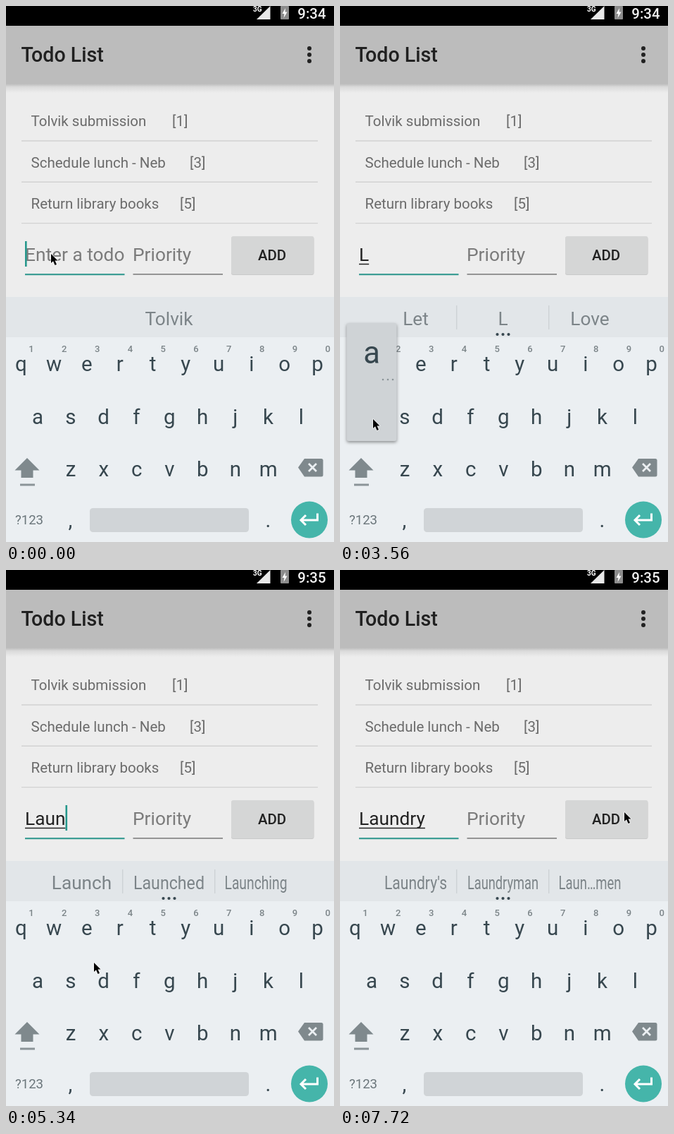
Write an HTML page with a canvas that moves like this. It is 466x759 px and loops after 8 s.

```html
<!DOCTYPE html>
<html lang="en">
<head>
<meta charset="utf-8">
<title>Todo List</title>
<style>
html, body { margin: 0; width: 100%; height: 100%; overflow: hidden; background: #ededed; }
canvas { display: block; }
</style>
</head>
<body>
<canvas id="stage" width="466" height="759"></canvas>
<script>
const ctx = document.getElementById('stage').getContext('2d');
const LOOP = 8000, STEP = 148.4;
const INK = '#37474f', TEAL = '#45b5aa', ICON = '#7f898d', BOARD = '#ebeff2', ACCENT = '#26988c';

const ROWS = [
  { keys: 'qwertyuiop', x: 21.3, y: 506 },
  { keys: 'asdfghjkl', x: 45, y: 581 },
  { keys: 'zxcvbnm', x: 92, y: 655 }
];
const PITCH = 46.8;

// [step, typed text, suggestions, autocorrecting]
const TYPING = [
  [-1.08, '', ['', 'Tolvik', ''], false],
  [20, 'L', ['Let', 'L', 'Love'], false],
  [25, 'La', ['Last', 'LA', 'Late'], true],
  [31, 'Lau', ['Laugh', 'Lay', 'Late'], true],
  [34, 'Laun', ['Launch', 'Launched', 'Launching'], false],
  [40, 'Laund', ['Laundry', 'Land', 'Laundering'], true],
  [44, 'Laundr', ['Laundr', 'Laundry', 'Laundering'], true],
  [48, 'Laundry', ["Laundry's", 'Laundryman', 'Laun…men'], false]
];

// [first step, last step, key]
const PRESSES = [
  [18, 19, 'l'], [23, 24, 'a'], [30, 30, 'u'], [33, 33, 'n'],
  [38, 39, 'd'], [43, 43, 'r'], [47, 47, 'y']
];

// [step, x, y] of the pointer tip
const POINTER = [
  [0, 64, 351], [5, 64, 351], [7, 58, 540], [9, 42, 710], [10, 36, 671], [11, 36, 671],
  [12, 62, 640], [15, 240, 605], [18, 415, 584], [19, 415, 584], [20, 365, 585],
  [23, 47, 585], [25, 47, 585], [29, 311, 505], [31, 309, 505], [33, 326, 650],
  [34, 322, 648], [36, 125, 556], [38, 139, 578], [40, 140, 575], [43, 161, 506],
  [44, 163, 506], [47, 256, 506], [48, 258, 504], [52, 404, 343]
];

function text(str, x, y, size, color, align = 'left', weight = 400) {
  ctx.font = `${weight} ${size}px Roboto, sans-serif`;
  ctx.textAlign = align;
  ctx.fillStyle = color;
  ctx.fillText(str, x, y);
}

function rect(x, y, w, h, color, r = 0) {
  ctx.fillStyle = color;
  ctx.beginPath();
  ctx.roundRect(x, y, w, h, r);
  ctx.fill();
}

function dot(x, y, r, color) {
  ctx.fillStyle = color;
  ctx.beginPath();
  ctx.arc(x, y, r, 0, 7);
  ctx.fill();
}

function shape(path, color, line) {
  const p = new Path2D(path);
  if (line) {
    ctx.strokeStyle = color;
    ctx.lineWidth = line;
    ctx.stroke(p);
  } else {
    ctx.fillStyle = color;
    ctx.fill(p);
  }
}

function pointerAt(n) {
  const i = POINTER.findIndex(p => p[0] > n);
  if (i < 0) return POINTER[POINTER.length - 1].slice(1);
  const [n0, x0, y0] = POINTER[i - 1], [n1, x1, y1] = POINTER[i];
  const k = (n - n0) / (n1 - n0);
  return [x0 + (x1 - x0) * k, y0 + (y1 - y0) * k];
}

function statusBar(clock) {
  rect(0, 0, 466, 28, '#000');
  text('3G', 351, 8, 10, '#fff', 'left', 700);
  shape('M356 19H375.500V0Z', '#e8e8e8');
  rect(390, 0, 12, 19, '#8c8c8c', 1);
  shape('M397 3L392.500 11H395.500L394.500 17L399.500 8.500H396.500Z', '#fff');
  text(clock, 454.500, 18, 20.4, '#f2f2f2', 'right', 500);
}

function toolbar() {
  const shade = ctx.createLinearGradient(0, 109, 0, 123);
  shade.addColorStop(0, '#b4b4b4');
  shade.addColorStop(0.4, '#dadada');
  shade.addColorStop(1, '#ededed');
  rect(0, 109, 466, 14, shade);
  rect(0, 28, 466, 82, '#bcbcbc');
  text('Todo List', 21.5, 79, 28.600, '#202020', 'left', 500);
  for (const y of [60, 69, 78]) dot(431, y, 3, '#222');
}

function list() {
  const items = [['Tolvik submission', 1, 236], ['Schedule lunch - Neb', 3, 261], ['Return library books', 5, 247]];
  items.forEach(([name, rank, x], i) => {
    const y = 170.3 + i * 58.3;
    text(name, 35.5, y, 20.5, '#6b6b6b');
    text(`[${rank}]`, x, y, 20.5, '#6b6b6b');
    rect(22, y + 20, 421, 1.4, '#d2d2d2');
  });
}

function form(n, since, typed, fixing) {
  text(typed || 'Enter a todo', 27, 361, 26.3, typed ? '#222' : '#7b7b7b');
  const width = typed ? ctx.measureText(typed).width : 0;
  if (typed) rect(27, fixing ? 363.5 : 364.8, width, fixing ? 3 : 1.5, fixing ? '#33b5e5' : '#222');
  rect(27, 379, 141.500, 2.3, '#3e9e95');
  text('Priority', 180, 361, 26.3, '#7b7b7b');
  rect(180.5, 379, 127.5, 1.7, '#888');
  // the caret restarts its half-second blink at each letter
  if (Math.floor((n - since) * STEP / 500) % 2 === 0) rect(27 + width, 333, 2.6, 36, ACCENT);
  rect(320, 327, 117.500, 54, '#c9c9c9', 3);
  rect(320, 326, 117.500, 54, '#d5d6d6', 3);
  text('ADD', 378, 360, 20.4, '#222', 'center', 500);
}

function suggestions(words, fixing) {
  rect(0, 412, 466, 57.500, '#e2e6e9');
  words.forEach((word, i) => {
    const bold = fixing && i === 1;
    ctx.save();
    ctx.translate([107.500, 231.5, 355][i], 451.5);
    ctx.font = `${bold ? 700 : 400} 26.2px Roboto, sans-serif`;
    // long words are condensed to the room in their cell
    const room = i === 1 ? 101 : 89;
    ctx.scale(Math.min(1, room / (ctx.measureText(word).width || 1)), 1);
    text(word, 0, 0, 26.2, bold ? INK : '#7c8488', 'center', bold ? 700 : 400);
    ctx.restore();
  });
  if (!words[0]) return;
  for (const x of [165, 296]) rect(x, 424, 1.4, 34, '#cdd2d5');
  for (const x of [223.5, 231.5, 239.5]) dot(x, 465, 2.1, INK);
}

function keyboard(shift) {
  rect(0, 469, 466, 290, BOARD);
  ROWS.forEach((row, r) => [...row.keys].forEach((key, i) => {
    const x = row.x + i * PITCH;
    text(shift ? key.toUpperCase() : key, x, row.y + 11, 29.5, INK, 'center');
    if (r === 0) text((i + 1) % 10, x + 14.7, 490, 13, '#7b8488', 'center', 500);
  }));

  shape('M30 640L47.500 657.500H38.500V668H21.500V657.500H12.500Z', shift ? TEAL : ICON);
  rect(20, 676.500, 21, 3, '#8b9498');
  shape('M415 653.500L424 641H448Q450.500 641 450.500 643.500V664Q450.500 666.500 448 666.500H424Z', ICON);
  shape('M430 648L441 659M441 648L430 659', BOARD, 2.8);

  text('?123', 33, 734, 18.600, '#6b767b', 'center');
  text(',', 91.500, 738, 29.5, INK, 'center');
  text('.', 372.500, 738, 29.5, INK, 'center');
  rect(119, 711, 226, 34, '#d0d4d7', 4.5);
  dot(431, 727.500, 26, TEAL);
  shape('M442.500 718.500V728H419M426 721L419 728L426 735', '#fff', 3);
}

function popup(key, shift) {
  const row = ROWS.find(r => r.keys.includes(key));
  const x = row.x + row.keys.indexOf(key) * PITCH;
  ctx.save();
  ctx.shadowColor = 'rgba(0,0,0,.4)';
  ctx.shadowBlur = 4;
  ctx.shadowOffsetY = 2;
  rect(x - 35.500, row.y - 132, 71, 167, '#cfd3d6', 3);
  ctx.restore();
  text(shift ? key.toUpperCase() : key, x, row.y - 75, 43.5, INK, 'center');
  if (key !== 'l') for (const d of [16, 23, 30]) dot(x + d, row.y - 52, 1.3, '#8b9498');
}

function pointer(x, y) {
  ctx.save();
  ctx.translate(x, y);
  const arrow = 'M0 0V13L3 10.300L5.500 16L8 15L5.600 9.500H9.500Z';
  ctx.lineJoin = 'round';
  shape(arrow, 'rgba(255,255,255,.8)', 1.6);
  shape(arrow, '#000');
  ctx.restore();
}

function draw(ms) {
  const n = Math.min(52, Math.floor((ms % LOOP + 6) / STEP));
  const [since, typed, words, fixing] = TYPING.filter(s => s[0] <= n).pop();
  const shift = n >= 11 && n < 20;
  const press = PRESSES.find(([a, b]) => n >= a && n <= b);

  rect(0, 0, 466, 759, '#ededed');
  statusBar(n < 29 ? '9:34' : '9:35');
  toolbar();
  list();
  form(n, since, typed, fixing);
  suggestions(words, fixing);
  keyboard(shift);
  if (press) popup(press[2], shift);
  pointer(...pointerAt(n));
}

const start = performance.now();
function tick() {
  draw(performance.now() - start);
  requestAnimationFrame(tick);
}
tick();
</script>
</body>
</html>
```
